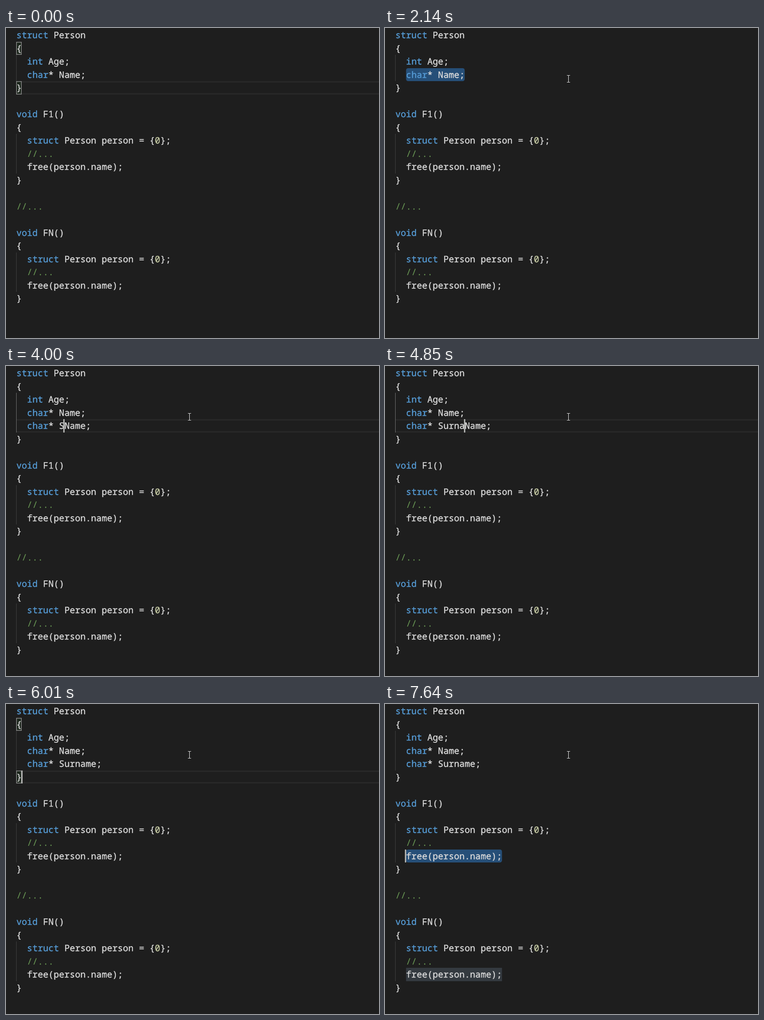
An HTML page for the animation above (8 s loop, 808x671 px).

```html
<!DOCTYPE html>
<html lang="en">
<head>
<meta charset="utf-8">
<title>Code editor</title>
<style>
  html, body { margin: 0; width: 100%; height: 100%; overflow: hidden; background: #1e1e1e; }
  svg { display: block; }
  text {
    font: 19.243px "Noto Sans Mono", "DejaVu Sans Mono", monospace;
    font-variant-ligatures: none;
    text-rendering: geometricPrecision;
    white-space: pre;
    color: #dadada;
  }
  text, tspan { fill: currentColor; stroke: currentColor; stroke-width: .4; }
  .key { color: #569cd6; }
  .note { color: #6a9955; stroke-width: .1; }
  .num { color: #c8cda6; }
  .select { fill: #264f78; }
  .match { fill: #343a40; }
  .guide { fill: #404040; }
  .guide.active { fill: #707070; }
  .current { fill: #282828; }
  .pair { fill: #1b251b; stroke: #888; stroke-width: 1.5; }
  .caret { fill: #aeafad; }
  #mouse path { fill: none; stroke: #111; stroke-width: 3; }
  #mouse path + path { stroke: #e4e4e4; stroke-width: 1.2; }
</style>
</head>
<body>
<svg width="808" height="671" viewBox="0 0 808 671">
  <g id="editor"></g>
  <g id="mouse">
    <path d="M-3.5-7.5H-1Q0-7.5 0-6.5Q0-7.5 1-7.5H3.5M0-7V7M-3.5 7.5H-1Q0 7.5 0 6.5Q0 7.5 1 7.5H3.5"/>
    <path d="M-3.5-7.5H-1Q0-7.5 0-6.5Q0-7.5 1-7.5H3.5M0-7V7M-3.5 7.5H-1Q0 7.5 0 6.5Q0 7.5 1 7.5H3.5"/>
  </g>
</svg>
<script>
// The editor is laid out in CSS pixels and shown at a scale of 1.5.
const LOOP = 8000, SCALE = 1.5, LEFT = 15 * SCALE, CHAR = 11.546, LINE = 19 * SCALE;
const editor = document.getElementById('editor');
const mouse = document.getElementById('mouse');

const head = ['struct Person', '{', '  int Age;', '  char* Name;'];
const body = name => [`void ${name}()`, '{', '  struct Person person = {0};', '  //...', '  free(person.name);', '}'];
const tail = ['}', '', ...body('F1'), '', '//...', '', ...body('FN')];

// Each step changes part of the editor state; sel is the other end of the selection.
const steps = [
  [0, { field: null, line: 5, col: 1, caret: false, sel: null, pair: [2, 5], marks: [] }],
  [910, { line: 4, col: 13, caret: true }],
  [980, { pair: [] }],
  [1450, { caret: false }],
  [1670, { col: 2, sel: 13, caret: true }],
  [2140, { caret: false }],
  [2600, { col: 13, sel: null, caret: true }],
  [2770, { field: '  ', line: 5, col: 2 }],
  [2920, { field: '  char* Name;', col: 13 }],
  [3230, { col: 12 }],
  [3460, { col: 8 }],
  ...[4000, 4150, 4300, 4700, 4850, 4930, 5080].map((t, i) =>
    [t, { field: `  char* ${'Surname'.slice(0, i + 1)}Name;`, col: 9 + i }]),
  [5470, { col: 19, sel: 15, marks: [[4, 8, 4], [5, 11, 4], [12, 14, 4], [21, 14, 4]] }],
  [5700, { field: '  char* Surname;', col: 15, sel: null, marks: [] }],
  [5930, { line: 6, col: 1 }],
  [6010, { pair: [2, 6] }],
  [6090, { line: 7, col: 0 }],
  [6170, { pair: [] }],
  [6320, { line: 8, col: 9 }],
  [6480, { line: 9, col: 1 }],
  [6560, { pair: [9, 13] }],
  [6640, { line: 10, col: 15 }],
  [6720, { pair: [] }],
  [6800, { line: 11, col: 7 }],
  [7030, { line: 12, col: 15 }],
  [7410, { col: 20 }],
  [7640, { col: 2, sel: 20, marks: [[21, 2, 18]] }]
];

const path = [
  [120, 641, 541], [200, 606, 480], [280, 540, 366], [360, 468, 240], [440, 416, 156],
  [520, 397.5, 128], [600, 405, 122], [750, 403, 117], [830, 399, 112], [910, 397.5, 110]
];

const x = col => LEFT + CHAR * col;
const y = line => Math.round(1 + LINE * (line - 1));
const caretX = col => Math.floor(LEFT + SCALE * (Math.round(CHAR * col / SCALE) - 1));
const rect = (cls, left, top, width, height, rx = 0) =>
  `<rect class="${cls}" x="${left}" y="${top}" width="${width}" height="${height}" rx="${rx}"/>`;
const rowRect = (cls, left, width, first, last = first, rx = 0) =>
  rect(cls, left, y(first), width, y(last + 1) - y(first), rx);

function paint(code) {
  return code.replace(/\b(struct|int|char|void)\b|\/\/.*|\b0\b/g, word => {
    const cls = word[0] === '/' ? 'note' : word === '0' ? 'num' : 'key';
    return `<tspan class="${cls}">${word}</tspan>`;
  });
}

function render(s) {
  const shift = s.field === null ? 0 : 1;
  const lines = [...head, ...(shift ? [s.field] : []), ...tail];
  const selected = s.sel !== null;
  let out = '';

  if (!selected) {
    out += rect('current', 22, y(s.line), 786, 3) + rect('current', 22, y(s.line + 1) - 3, 786, 3);
  }
  for (const [line, col, n] of s.marks) out += rowRect('match', x(col), CHAR * n, line);
  if (selected) {
    const from = Math.min(s.col, s.sel), n = Math.abs(s.col - s.sel);
    out += rowRect('select', x(from), CHAR * n, s.line, s.line, 4.5);
  }
  for (const [first, last] of [[3, 4 + shift], [9 + shift, 11 + shift], [18 + shift, 20 + shift]]) {
    const active = !selected && s.line >= first && s.line <= last;
    out += rowRect(active ? 'guide active' : 'guide', 22, 1, first, last);
  }
  for (const line of s.pair) {
    out += rect('pair', 22.75, y(line) + .75, 10.5, y(line + 1) - y(line) - 1.5);
  }
  lines.forEach((code, i) => {
    out += `<text x="${LEFT}" y="${y(i + 1) + 21}">${paint(code)}</text>`;
  });
  if (s.caret) out += rowRect('caret', caretX(s.col), 3, s.line);
  editor.innerHTML = out;
}

const states = [];
steps.reduce((state, [, change]) => {
  const next = { ...state, ...change };
  states.push(next);
  return next;
}, {});

const indexAt = (list, t) => list.filter(item => item[0] <= t).length - 1;
let shown = -1;

function tick() {
  const t = performance.now() % LOOP;
  const i = indexAt(steps, t), m = path[indexAt(path, t)];
  if (i !== shown) render(states[shown = i]);
  mouse.setAttribute('visibility', m ? 'visible' : 'hidden');
  if (m) mouse.setAttribute('transform', `translate(${m[1]} ${m[2]})`);
  requestAnimationFrame(tick);
}
tick();
</script>
</body>
</html>
```
